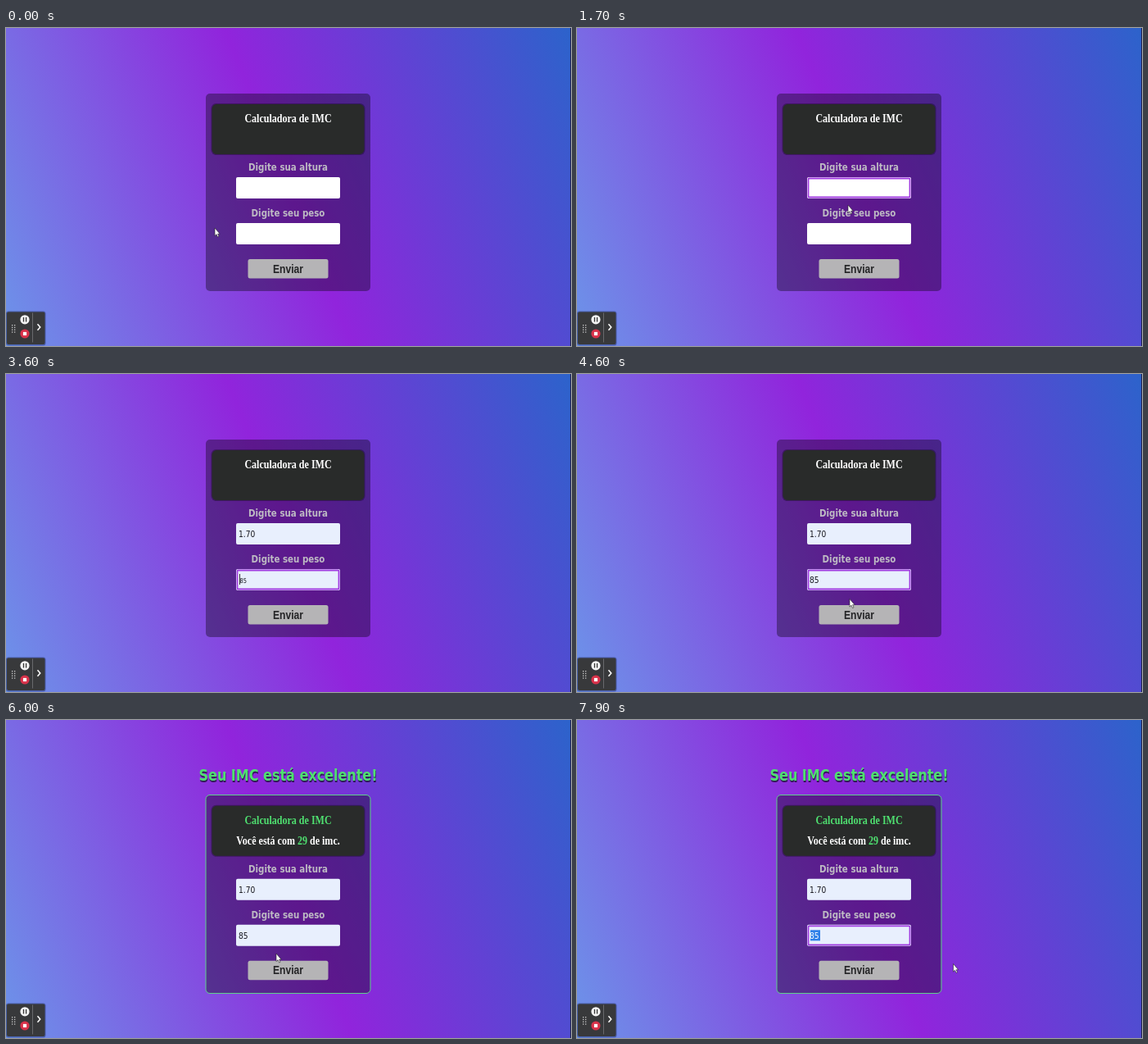
An HTML page for the animation above (8000 ms loop, 690 by 388 pixels).

```html
<!DOCTYPE html>
<html lang="pt-BR">
<head>
<meta charset="utf-8">
<title>Calculadora de IMC</title>
<style>
  html, body { margin: 0; width: 100%; height: 100%; overflow: hidden; }
  body { background: linear-gradient(68deg, #6c94e9, #9124dc 50%, #2c63cb); }
  svg { position: absolute; left: 0; top: 0; display: block; }
  .serif { font: bold 14.5px "Liberation Serif", serif; }
  .label { font: bold 12.4px "DejaVu Sans", sans-serif; fill: #bdb9c3; }
  .value { font: 11px "DejaVu Sans", sans-serif; fill: #15151c; }
  .send { font: bold 14.6px "Liberation Sans", sans-serif; fill: #242426; }
  .head { font: bold 19.3px "DejaVu Sans", sans-serif; }
  .mid { text-anchor: middle; }
</style>
</head>
<body>
<svg id="stage" width="690" height="388" viewBox="0 0 690 388">
  <rect x="689" width="1" height="388" fill="#1d2150"/>

  <g id="head"></g>
  <rect id="card" x="244" width="201" rx="5" fill="#000" fill-opacity=".36"/>
  <g id="form">
    <rect x="250.5" y="92" width="188" height="63" rx="6" fill="#000" opacity=".3"/>
    <rect x="251.5" y="93" width="186" height="61" rx="6" fill="#292b2a"/>
    <g id="texts"></g>
    <rect id="btn" x="295.5" y="282" width="98" height="23.5" rx="2.5"/>
    <g id="send"></g>
  </g>

  <g id="bar">
    <rect x="0" y="345.5" width="48.5" height="42" rx="3" fill="#1d2a60" opacity=".45"/>
    <rect x="1" y="346.5" width="46.5" height="39.5" rx="2" fill="#38393b"/>
    <g id="dots" fill="#c9c9c9"></g>
    <circle cx="23" cy="355.8" r="5.6" fill="#f4f4f4"/>
    <path d="M21.5 353v5.6M24.6 353v5.6" stroke="#333" stroke-width="1.3"/>
    <circle cx="23" cy="373" r="5.6" fill="#d8324a"/>
    <rect x="20.9" y="370.9" width="4.2" height="4.2" fill="#fff"/>
    <path d="M32.5 347.5v36" stroke="#77787a" stroke-width=".8"/>
    <path d="M38.5 361.2l3.3 3.8l-3.3 3.8" fill="none" stroke="#fff" stroke-width="1.5"/>
  </g>

  <circle id="ring" r="16.3" fill="none" stroke="#c4143c" stroke-width="2"/>
  <path id="mouse" d="M0 0V9.6L2 7.7L3.5 11L5 10.3L3.6 7.2H6.2Z" fill="#fff" stroke="#222" stroke-width=".6"/>
</svg>
<script>
const NS = "http://www.w3.org/2000/svg";
const LOOP = 8000, STEP = 100;
const SQUEEZE = 0.83; // the page is shown narrower than it is tall
const GREEN = "#4fe070";
const $ = id => document.getElementById(id);

function add(parent, tag, attrs) {
  const el = document.createElementNS(NS, tag);
  for (const k in attrs) el.setAttribute(k, attrs[k]);
  return parent.appendChild(el);
}

function label(parent, cls, x, y, text, attrs) {
  const el = add(parent, "text", {
    class: cls, transform: `translate(${x} ${y}) scale(${SQUEEZE} 1)`, ...attrs
  });
  el.textContent = text;
  return el;
}

function field(y, text) {
  const g = $("texts");
  return {
    box: add(g, "rect", { x: 281, y, width: 127, height: 26, rx: 2 }),
    edge: add(g, "rect", { x: 282.5, y: y + 1.5, width: 124, height: 23, rx: 1,
      fill: "none", stroke: "#a03be0", "stroke-width": 1.8 }),
    mark: add(g, "rect", { x: 285, y: y + 6.5, width: 12, height: 13, fill: "#2f80e8" }),
    value: label(g, "value", 284, y + 17, text),
    hint: label(g, "value", 285.5, y + 17, text, { style: "font-size:8px" }),
    caret: add(g, "rect", { x: 285, y: y + 6, width: 0.9, height: 13, fill: "#222" })
  };
}

const texts = $("texts");
const title = label(texts, "serif mid", 344.5, 115, "Calculadora de IMC");
const result = label(texts, "serif mid", 344.5, 139.7, "Você está com ", { fill: "#fff" });
add(result, "tspan", { fill: GREEN }).textContent = "29";
add(result, "tspan", {}).textContent = " de imc.";
label(texts, "label mid", 344.5, 174, "Digite sua altura");
label(texts, "label mid", 344.5, 229.8, "Digite seu peso");
const height = field(182, "1.70");
const weight = field(238, "85");
label($("send"), "send mid", 344.5, 298.6, "Enviar");

const verdict = "Seu IMC está excelente!";
label($("head"), "head mid", 345, 76.3, verdict, { fill: "#15122c", opacity: 0.75 });
label($("head"), "head mid", 344.5, 73.6, verdict, { fill: GREEN });

for (let i = 0; i < 8; i++)
  add($("dots"), "rect", { x: 7 + (i % 2) * 3, y: 362 + (i >> 1) * 2.8, width: 1.3, height: 1.3 });

// pointer: time, x, y
const path = [
  [0, 255, 244], [700, 302, 190], [1500, 302, 190], [1700, 331, 216],
  [2100, 331, 216], [2500, 324, 249], [4400, 336, 264], [4800, 330, 285],
  [6200, 330, 285], [6600, 299, 263], [6900, 279, 266], [7100, 280, 267],
  [7900, 459.5, 297.5], [LOOP, 459.5, 297.5]
];
const clicks = [[1100, 1400], [2800, 3200], [5000, 5400], [6600, 7100]];
const within = (t, a, b) => t >= a && t < b;

function pointer(t) {
  const i = path.findIndex(p => p[0] > t);
  const [t0, x0, y0] = path[i - 1], [t1, x1, y1] = path[i];
  const k = (t - t0) / (t1 - t0);
  return [x0 + (x1 - x0) * k, y0 + (y1 - y0) * k];
}

function show(el, on) { el.style.display = on ? "" : "none"; }

function paint(f, s) {
  f.box.setAttribute("fill", s.hint || s.full ? "#e8effd" : "#fff");
  show(f.edge, s.focus);
  show(f.hint, s.hint);
  show(f.value, s.full);
  show(f.caret, s.caret);
  show(f.mark, s.mark);
  f.value.style.fill = s.mark ? "#fff" : "";
}

function draw(now) {
  const t = Math.floor((now % LOOP) / STEP) * STEP;
  const done = t >= 5300;

  show($("head"), done);
  show(result, done);
  title.setAttribute("fill", done ? GREEN : "#fff");
  $("form").setAttribute("transform", `translate(0 ${done ? 11.8 : 0})`);
  const card = $("card");
  card.setAttribute("y", done ? 91.5 : 80);
  card.setAttribute("height", done ? 242 : 241);
  card.setAttribute("stroke", done ? "#5fcf8c" : "none");

  paint(height, { focus: within(t, 1100, 2800), hint: within(t, 1900, 2200), full: t >= 2200 });
  paint(weight, {
    focus: within(t, 2800, 5000) || t >= 6600,
    hint: within(t, 3400, 4300), full: t >= 4300,
    caret: within(t, 3400, 4300), mark: t >= 6800
  });
  $("btn").setAttribute("fill", within(t, 4700, 5300) ? "#aaa0b2" : "#b5b4b6");

  const at = `translate(${pointer(t).join(" ")})`;
  $("mouse").setAttribute("transform", at);
  $("ring").setAttribute("transform", at);
  show($("mouse"), !within(t, 3200, 4500));
  show($("ring"), clicks.some(([a, b]) => within(t, a, b)));
}

const start = performance.now();
function tick() {
  draw(performance.now() - start);
  requestAnimationFrame(tick);
}
tick();
</script>
</body>
</html>
```
